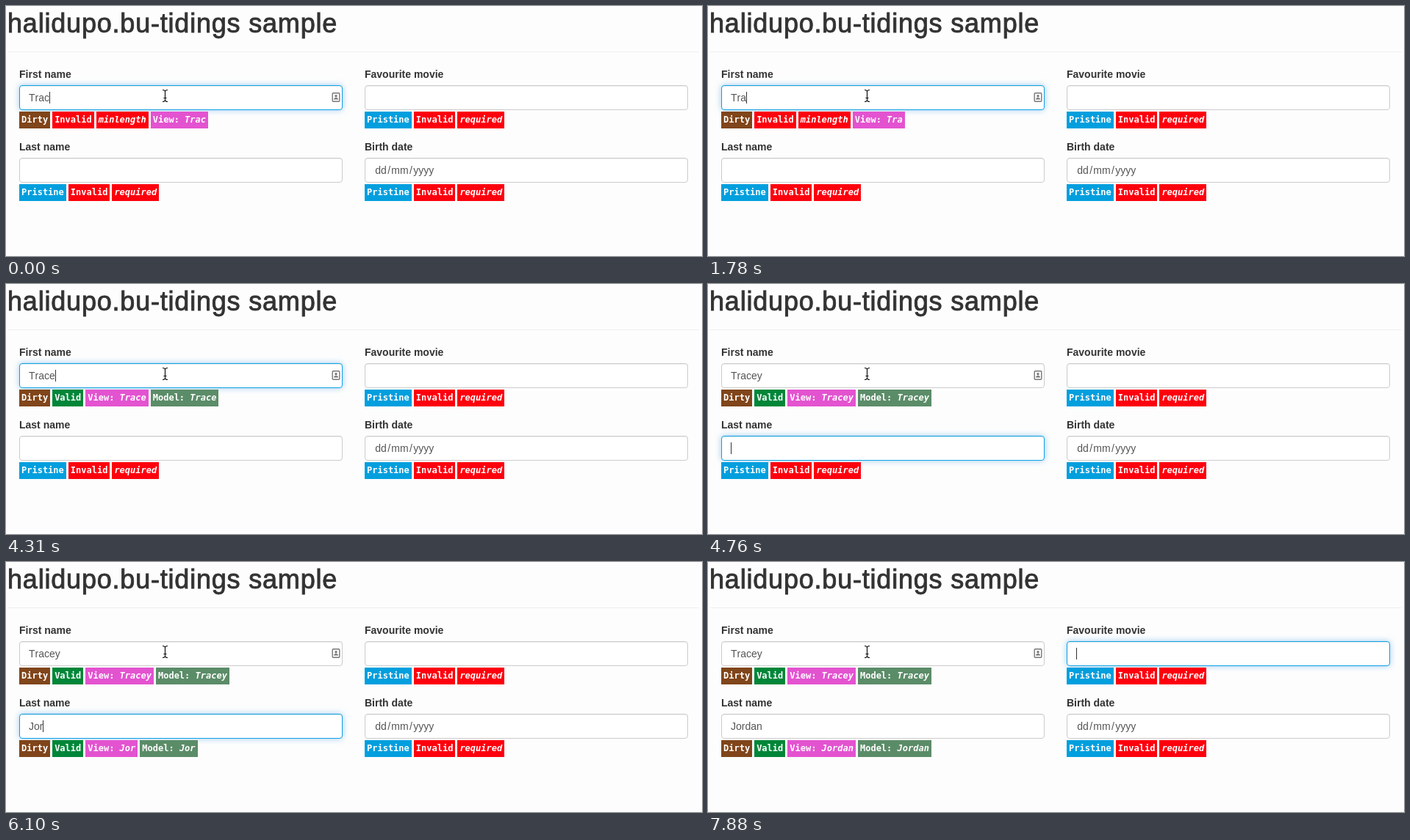
An HTML page for the animation above (8 s loop, 947 by 341 pixels).

```html
<!DOCTYPE html>
<html lang="en">
<head>
<meta charset="utf-8">
<title>Form sample</title>
<style>
  html, body { margin: 0; width: 100%; height: 100%; overflow: hidden; background: #fdfdfd; }
  #stage {
    position: relative; width: 947px; height: 341px; overflow: hidden;
    color: #333; font: 14px/20px "Liberation Sans", Arial, sans-serif;
  }
  #stage > * { position: absolute; }
  h1 {
    left: 2px; top: 4px; margin: 0; white-space: nowrap;
    font-size: 36px; line-height: 40px; font-weight: 400;
    letter-spacing: .8px; -webkit-text-stroke: .9px #333;
  }
  hr { left: 3px; top: 62px; width: 940px; height: 1px; margin: 0; border: 0; background: #eee; }
  .group { width: 440px; }
  .label { display: block; margin-bottom: 5px; font-weight: 700; }
  .input {
    --glow: 0%;
    box-sizing: border-box; height: 34px; padding: 0 12px;
    border: 1px solid color-mix(in srgb, #0fa1e3 var(--glow), #ccc); border-radius: 4px;
    background: #fff; color: #555; line-height: 32px; white-space: pre; font-kerning: none;
    box-shadow: inset 0 1px 1px rgba(0, 0, 0, .075),
      0 0 8px color-mix(in srgb, rgba(102, 175, 233, .6) var(--glow), transparent);
  }
  .caret {
    display: inline-block; width: 1px; height: 16px; margin-left: -.3px;
    background: #333; vertical-align: -3px;
  }
  .part { padding: 0 1.3px; }
  .badges {
    display: flex; gap: 3px; margin-top: 2px;
    font: 700 12px/23px "DejaVu Sans Mono", monospace; color: #fff;
  }
  .badges span { padding: 0 3px; white-space: pre; }
  .pristine { background: #019fde; }
  .dirty { background: #80451a; }
  .valid { background: #008638; }
  .invalid { background: #fd000d; }
  .view { background: #e353d0; }
  .model { background: #5b8c68; }
  svg { left: 0; top: 0; }
</style>
</head>
<body>
<div id="stage">
  <h1>halidupo.bu-tidings sample</h1>
  <hr>
  <svg width="947" height="341" fill="none">
    <g id="contact" stroke="#777" stroke-width="1.4">
      <rect x="444.2" y="118.7" width="9.6" height="11.6" rx="1.2"/>
      <circle cx="449" cy="122.8" r="1.7" fill="#777" stroke="none"/>
      <path d="M446 127.5q0-2.5 3-2.5t3 2.5z" fill="#777" stroke="none"/>
    </g>
    <g id="pointer">
      <path id="beam" d="M213 114.5q3.5 0 3.5 2.5v11q0 2.5-3.5 2.5M220 114.5q-3.5 0-3.5 2.5M216.5 128q0 2.5 3.5 2.5M214.5 125.5h4" stroke="#fff" stroke-width="2.6"/>
      <use href="#beam" style="stroke: #000"/>
      <path d="M213 114.5q3.5 0 3.5 2.5v11q0 2.5-3.5 2.5M220 114.5q-3.5 0-3.5 2.5M216.5 128q0 2.5 3.5 2.5M214.5 125.5h4" stroke="#111" stroke-width="1.2"/>
    </g>
  </svg>
</div>
<script>
  const LOOP = 8000;
  const MIN_LENGTH = 5;

  // time, first name, last name, focused field (.5 = halfway to the next), caret
  const steps = [
    [0, 'Trac', '', 0, 1],
    [300, 'Trac', '', 0, 0],
    [440, 'Trace', '', 0, 1],
    [590, 'Tracey', '', 0, 1],
    [1040, 'Tracey', '', 0, 0],
    [1340, 'Trace', '', 0, 1],
    [1490, 'Trac', '', 0, 1],
    [1780, 'Tra', '', 0, 1],
    [1930, 'Tr', '', 0, 1],
    [2070, 'T', '', 0, 1],
    [2220, '', '', 0, 1],
    [2820, 'T', '', 0, 1],
    [3120, 'Tra', '', 0, 1],
    [3420, 'Trac', '', 0, 1],
    [3870, 'Trac', '', 0, 0],
    [4310, 'Trace', '', 0, 1],
    [4460, 'Tracey', '', 0, 1],
    [4610, 'Tracey', '', .5, 1],
    [4760, 'Tracey', '', 1, 1],
    [5210, 'Tracey', 'J', 1, 1],
    [5350, 'Tracey', 'Jo', 1, 1],
    [5800, 'Tracey', 'Jo', 1, 0],
    [6100, 'Tracey', 'Jor', 1, 1],
    [6240, 'Tracey', 'Jord', 1, 1],
    [6540, 'Tracey', 'Jorda', 1, 1],
    [6690, 'Tracey', 'Jordan', 1, 1],
    [6840, 'Tracey', 'Jordan', 1.5, 1],
    [6980, 'Tracey', 'Jordan', 2, 1],
    [7430, 'Tracey', 'Jordan', 2, 0],
    [7880, 'Tracey', 'Jordan', 2, 1],
  ];

  const stage = document.getElementById('stage');
  const svg = stage.querySelector('svg');

  function addField(label, x, y) {
    const group = document.createElement('div');
    group.className = 'group';
    group.style.cssText = `left:${x}px;top:${y}px`;
    group.innerHTML = `<span class="label">${label}</span><div class="input"></div><div class="badges"></div>`;
    stage.insertBefore(group, svg);
    return { input: group.children[1], badges: group.children[2] };
  }

  const fields = [
    addField('First name', 18, 83),
    addField('Last name', 18, 182),
    addField('Favourite movie', 488, 83),
    addField('Birth date', 488, 182),
  ];

  const badge = (kind, text, value = '') =>
    `<span class="${kind}">${text}${value && `<em>${value}</em>`}</span>`;

  function badgeRow(value, dirty, minLength) {
    const error = !value ? 'required' : value.length < minLength ? 'minlength' : '';
    return (dirty ? badge('dirty', 'Dirty') : badge('pristine', 'Pristine'))
      + (error ? badge('invalid', 'Invalid') + badge('invalid', '', error) : badge('valid', 'Valid'))
      + (value ? badge('view', 'View: ', value) : '')
      + (error ? '' : badge('model', 'Model: ', value));
  }

  function show([, first, last, focus, caret]) {
    [first, last, ''].forEach((value, i) => {
      const { input, badges } = fields[i];
      const hasCaret = caret && Math.round(focus) === i;
      input.innerHTML = value + (hasCaret ? '<i class="caret"></i>' : '');
      input.style.setProperty('--glow', Math.max(0, 1 - Math.abs(focus - i)) * 100 + '%');
      badges.innerHTML = badgeRow(value, i === 0 || value !== '', i === 0 ? MIN_LENGTH : 0);
    });
  }

  const date = fields[3];
  date.input.innerHTML = ['dd', 'mm', 'yyyy'].map(p => `<span class="part">${p}</span>`).join('/');
  date.badges.innerHTML = badgeRow('', false, 0);

  let shown;
  const start = performance.now();

  function tick() {
    const time = (performance.now() - start) % LOOP;
    const step = steps.findLast(s => s[0] <= time) || steps[0];
    if (step !== shown) show(shown = step);
    requestAnimationFrame(tick);
  }
  tick();
</script>
</body>
</html>
```
